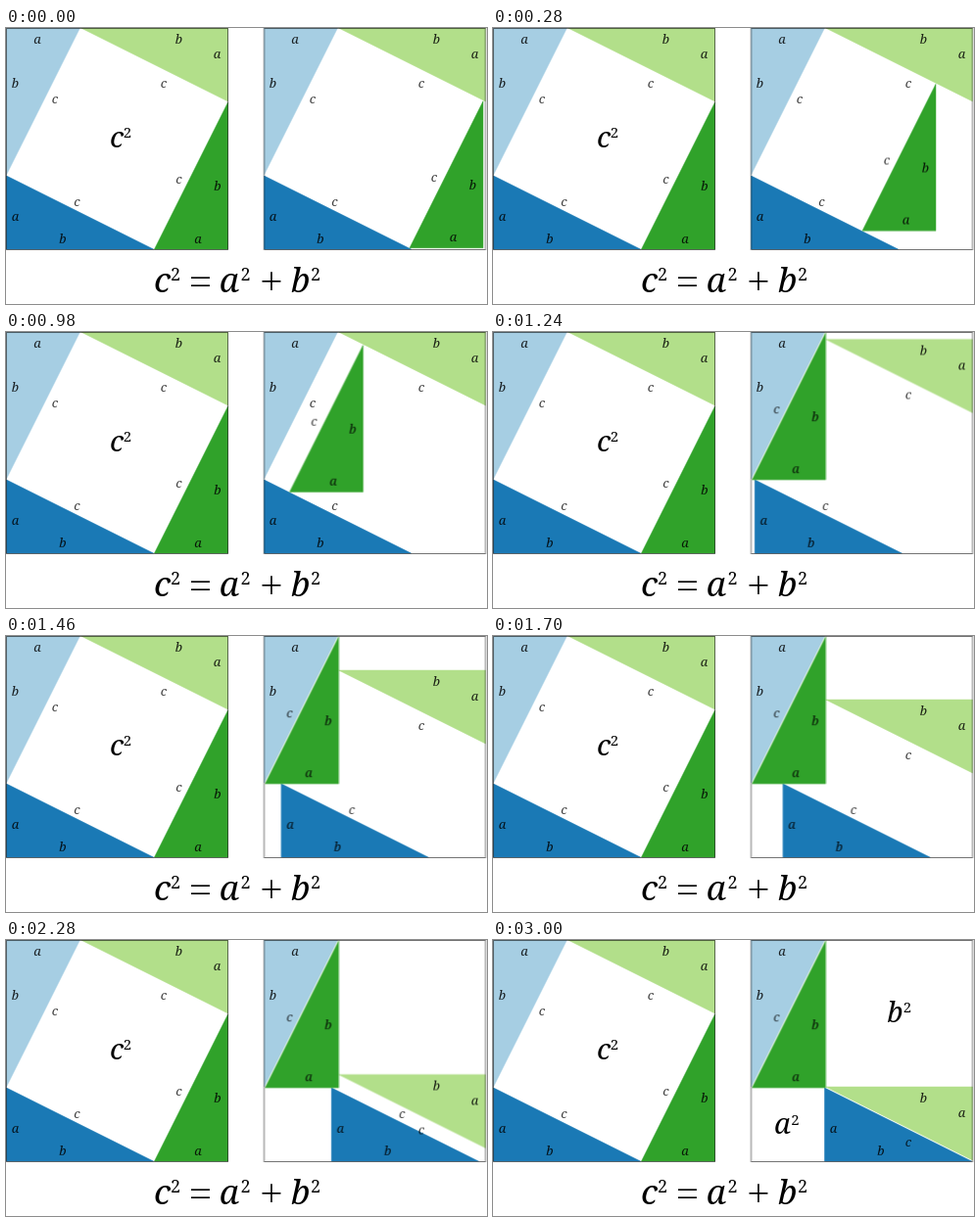
Write an HTML page that moves like this. It is 491 px wide and 282 px high and loops after 3260 ms.

```html
<!DOCTYPE html>
<html lang="en">
<head>
<meta charset="utf-8">
<title>Pythagorean theorem by rearrangement</title>
<style>
html, body { margin: 0; width: 100%; height: 100%; overflow: hidden; background: #fff; }
svg { display: block; width: 491px; height: 282px; }
text { font-family: "Noto Serif", "DejaVu Serif", serif; font-weight: 300; font-style: italic; text-anchor: middle; }
path { stroke-width: .5; stroke-linejoin: round; }
.side text { font-size: 13px; fill-opacity: .85; }
.side .hyp { fill-opacity: .75; }
.area text { font-size: 29px; }
.area .sup { font-size: 15px; font-style: normal; }
.sum text { font-size: 35px; }
.sum .sup { font-size: 18px; font-style: normal; }
.sum .op { font: 300 41px "Open Sans", "Noto Sans", sans-serif; }
.frame { fill: none; stroke: #000; stroke-opacity: .55; }

/* Loop: 1200 ms slide, 1200 ms slide, 620 ms fade, 240 ms hold.
   The 1 ms lead keeps samples clear of step edges. */
.slide1, .slide2, .fade { animation: 3260ms -1ms infinite both; }
.slide1 { animation-name: slide1; }
.slide2 { animation-name: slide2; }
.fade { animation-name: fade; }
.dark { --to: translate(-150px, -75px); }
.light { --to: translate(0, 150px); }
.blue { --to: translate(75px, 0); }

@keyframes slide1 {
  0% { transform: translate(0, 0); animation-timing-function: steps(60, start); }
  36.809816%, 100% { transform: var(--to); }
}
@keyframes slide2 {
  0%, 36.809816% { transform: translate(0, 0); animation-timing-function: steps(60, start); }
  73.619632%, 100% { transform: var(--to); }
}
@keyframes fade {
  0%, 73.619632% { opacity: 0; animation-timing-function: steps(31, start); }
  92.638037%, 100% { opacity: 1; }
}
</style>
</head>
<body>
<svg viewBox="0 0 491 282">
  <defs>
    <g id="sky" class="side">
      <path d="M0 0H75L0 150Z" fill="#a6cee3" stroke="#a6cee3"/>
      <text x="31.5" y="16">a</text><text x="9" y="61">b</text><text class="hyp" x="49.5" y="76.5">c</text>
    </g>
    <g id="blue" class="side">
      <path d="M0 151V226H150Z" fill="#1a79b5" stroke="#1a79b5"/>
      <text x="9" y="196.5">a</text><text x="57.5" y="219.5">b</text><text class="hyp" x="72" y="182">c</text>
    </g>
    <g id="light" class="side">
      <path d="M76 0H226V75Z" fill="#b2df8a" stroke="#b2df8a"/>
      <text x="176" y="16">b</text><text x="215" y="30.5">a</text><text class="hyp" x="160.5" y="60.5">c</text>
    </g>
    <g id="dark" class="side">
      <path d="M226 76V226H151Z" fill="#30a22a" stroke="#30a22a"/>
      <text x="215.5" y="166">b</text><text x="195.5" y="219.5">a</text><text class="hyp" x="176" y="158.5">c</text>
    </g>
  </defs>

  <g transform="translate(.5)">
    <use href="#sky"/>
    <use href="#blue"/>
    <use href="#light"/>
    <use href="#dark"/>
    <rect class="frame" y=".5" width="226" height="226"/>
  </g>
  <g class="area">
    <text x="113" y="121.5">c</text><text class="sup" x="124" y="112">2</text>
  </g>

  <g transform="translate(263.5)">
    <use href="#sky"/>
    <use class="slide2 blue" href="#blue"/>
    <use class="slide2 light" href="#light"/>
    <use class="slide1 dark" href="#dark"/>
    <rect class="frame" y=".5" width="226" height="226"/>
  </g>
  <g class="area fade">
    <text x="410.5" y="84">b</text><text class="sup" x="423" y="74">2</text>
    <text x="295.5" y="198">a</text><text class="sup" x="308.5" y="188.5">2</text>
  </g>

  <g class="sum">
    <text x="159.5" y="270">c</text><text class="sup" x="173" y="258">2</text>
    <text class="op" x="198.5" y="273">=</text>
    <text x="228" y="270">a</text><text class="sup" x="244.5" y="258">2</text>
    <text class="op" x="271" y="273">+</text>
    <text x="300.5" y="270">b</text><text class="sup" x="316" y="258">2</text>
  </g>
</svg>
</body>
</html>
```
